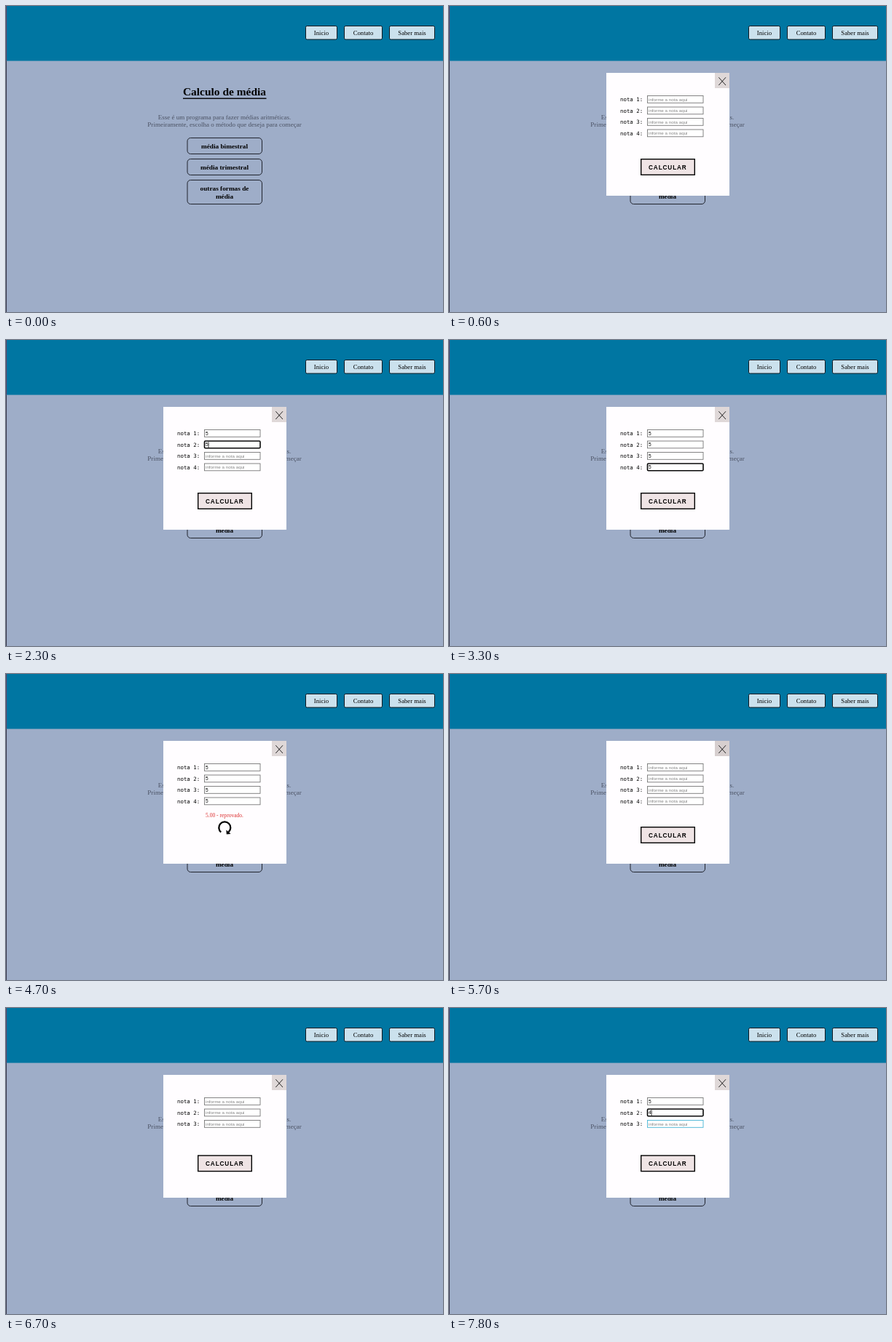
An HTML page that plays this animation: 600 px wide and 421 px high, repeating every 8000 ms.

```html
<!DOCTYPE html>
<html lang="pt">
<head>
<meta charset="utf-8">
<title>Calculo de média</title>
<style>
html, body { margin: 0; width: 100%; height: 100%; overflow: hidden; background: #9eadc8; }
svg { display: block; width: 600px; height: 421px; }
.serif { font-family: "Liberation Serif", serif; }
.bold { font-weight: bold; }
.sans { font-family: "Liberation Sans", sans-serif; }
.mono { font-family: "DejaVu Sans Mono", monospace; }
.mid { text-anchor: middle; }
</style>
</head>
<body>
<svg id="stage" viewBox="0 0 600 421" xmlns="http://www.w3.org/2000/svg"></svg>
<script>
const LOOP = 8000, STEP = 100;
const stage = document.getElementById("stage");

function add(parent, tag, attrs, text) {
  const el = document.createElementNS("http://www.w3.org/2000/svg", tag);
  set(el, attrs);
  if (text !== undefined) el.textContent = text;
  parent.appendChild(el);
  return el;
}
function set(el, attrs) {
  for (const k in attrs) el.setAttribute(k, attrs[k]);
}
const group = parent => add(parent, "g", {});
const box = (p, x, y, width, height, fill, more) =>
  add(p, "rect", { x, y, width, height, fill, ...more });
const label = (p, x, y, size, cls, text, fill = "#000") =>
  add(p, "text", { x, y, "font-size": size, class: cls, fill }, text);
const show = (el, on) => el.setAttribute("visibility", on ? "inherit" : "hidden");
const within = (t, [a, b]) => t >= a && t < b;
const mix = (a, b, k) =>
  `rgb(${a.map((v, i) => Math.round(v + (b[i] - v) * k)).join(",")})`;

// Hover strength: fades in over three steps, out over two
function hover(t, spans) {
  return Math.max(0, ...spans.map(([a, b]) =>
    t < a ? 0 : Math.min(1, (t - a + STEP) / 300, Math.max(0, 1 - (t - b) / 200))));
}

// Page
box(stage, 0, 0, 600, 421, "#9eadc8");
box(stage, 0, 0, 600, 75.5, "#0076a2");
box(stage, 0, 0, 1, 75.5, "#5d4468");
box(stage, 0, 75.5, 1, 345.5, "#3c3a4e");

for (const [x, w, text] of [[411.5, 43, "Inicio"], [464.5, 52, "Contato"], [526.5, 62, "Saber mais"]]) {
  box(stage, x, 27.5, w, 18.5, "#cbe1ed", { rx: 1.8, stroke: "#101820" });
  label(stage, x + w / 2, 39.7, 8.7, "serif mid", text);
}

label(stage, 300, 123, 15.45, "serif bold mid", "Calculo de média");
box(stage, 243, 126.5, 114.5, 1.4, "#000");
label(stage, 300, 155.7, 8.97, "serif mid", "Esse é um programa para fazer médias aritméticas.", "#4c5364");
label(stage, 300, 166.2, 9.03, "serif mid", "Primeiramente, escolha o método que deseja para começar", "#4c5364");

const choices = [
  [181.5, 22, ["média bimestral"]],
  [210.5, 22, ["média trimestral"]],
  [239.5, 33, ["outras formas de", "média"]]
].map(([y, h, lines]) => {
  const r = box(stage, 249, y, 102.5, h, "#cbe1ed", { rx: 4.5, stroke: "#20242e", "fill-opacity": 0 });
  lines.forEach((s, i) => label(stage, 300, y + 14 + i * 11.5, 9.28, "serif bold mid", s));
  return r;
});

// Dialog
const dialog = group(stage);
box(dialog, 216, 92, 169, 169, "#fffdff");
const closeBox = box(dialog, 365, 92, 20, 21, "#dfd8d8");
add(dialog, "path", { d: "M370.3 98.2L380 109M380 98.2L370.3 109", stroke: "#111", "stroke-width": 0.9 });

const fields = [0, 1, 2, 3].map(i => {
  const y = 123 + i * 15.5, g = group(dialog);
  label(g, 235, y + 8, 7.38, "mono", `nota ${i + 1}:`);
  return {
    y, g,
    frame: box(g, 272.5, y + 0.5, 76.5, 9.8, "#fff", { stroke: "#777" }),
    hint: label(g, 274, y + 7.7, 6.25, "sans", "informe a nota aqui", "#858585"),
    value: label(g, 274, y + 7.8, 6.5, "sans", ""),
    caret: box(g, 274, y + 1.8, 0.8, 7.6, "#000")
  };
});

const calc = group(dialog);
const calcBox = box(calc, 263.7, 210.7, 73.6, 21.6, "#efe4e5", { stroke: "#000", "stroke-width": 1.4 });
label(calc, 274, 224.6, 8.2, "sans bold", "CALCULAR").setAttribute("letter-spacing", 0.9);

const result = group(dialog);
label(result, 300, 197.3, 7.55, "serif mid", "5.00 - reprovado.", "#dc2f2f");
add(result, "path", {
  d: "M295.2 217.6A8 8 0 1 1 305.6 217.4",
  fill: "none", stroke: "#000", "stroke-width": 2.3
});
add(result, "path", { d: "M302.4 214.6L302.8 220.6L308.6 220Z" });

const list = group(dialog);
box(list, 272, 0, 94, 43.5, "#fff", { stroke: "#c8c8c8", "stroke-width": 0.8 });
const listText = label(list, 277, 13, 6.5, "sans", "");

// Per field: focus span, time typed, text, suggestion span, hover spans
const forms = [
  { open: [500, 6000], calcY: 0, result: [4700, 5400], reset: 5400, fields: [
    { focus: [1100, 1800], typed: 1500, text: "5", list: [1500, 1700], hover: [[800, 1600]] },
    { focus: [1800, 2600], typed: 2100, text: "5", list: [2100, 2300], hover: [[1700, 2000]] },
    { focus: [2600, 2900], typed: 2700, text: "5", list: [2700, 2800], hover: [[2500, 2700]] },
    { focus: [2900, 3500], typed: 3100, text: "5", list: [0, 0], hover: [[2800, 3000], [3800, 3900]] }
  ] },
  { open: [6600, LOOP], calcY: -7.7, result: [0, 0], reset: LOOP, fields: [
    { focus: [7000, 7600], typed: 7400, text: "5", list: [7400, 7600], hover: [[6800, 7400]] },
    { focus: [7600, LOOP], typed: 7700, text: "4", list: [7700, 7800], hover: [] },
    { focus: [LOOP, LOOP], typed: LOOP, text: "", list: [0, 0], hover: [[7600, LOOP]] }
  ] }
];
const caretOff = [[1300, 1500], [3300, 3500], [7200, 7400]];

function drawField(f, spec, t, reset) {
  show(f.g, !!spec);
  if (!spec) return;
  const focused = within(t, spec.focus);
  const filled = t >= spec.typed && t < reset;
  const edge = mix([119, 119, 119], [70, 180, 212], hover(t, spec.hover));
  set(f.frame, {
    stroke: focused ? "#080808" : edge,
    "stroke-width": focused ? 1.6 : 0.9,
    rx: focused ? 1.2 : 0
  });
  f.value.textContent = filled ? spec.text : "";
  show(f.hint, !filled);
  f.caret.setAttribute("x", filled ? 277.7 : 274);
  show(f.caret, focused && !caretOff.some(s => within(t, s)));
  if (within(t, spec.list)) {
    show(list, true);
    list.setAttribute("transform", `translate(0 ${f.y + 11})`);
    listText.textContent = spec.text;
  }
}

function draw(now) {
  const t = Math.floor((now % LOOP) / STEP) * STEP;
  choices[0].setAttribute("fill-opacity", hover(t, [[100, 500]]) * 0.6);
  choices[1].setAttribute("fill-opacity", hover(t, [[6300, 6600]]) * 0.6);

  const form = forms.find(f => within(t, f.open));
  show(dialog, !!form);
  if (form) {
    show(list, false);
    fields.forEach((f, i) => drawField(f, form.fields[i], t, form.reset));
    const done = within(t, form.result);
    show(result, done);
    show(calc, !done);
    calc.setAttribute("transform", `translate(0 ${form.calcY})`);
    calcBox.setAttribute("fill", mix([239, 228, 229], [214, 202, 204], hover(t, [[4100, 4700]])));
    closeBox.setAttribute("fill", mix([223, 216, 216], [200, 190, 190], hover(t, [[5700, 6000]])));
  }
}

function tick() {
  draw(performance.now());
  requestAnimationFrame(tick);
}
tick();
</script>
</body>
</html>
```
